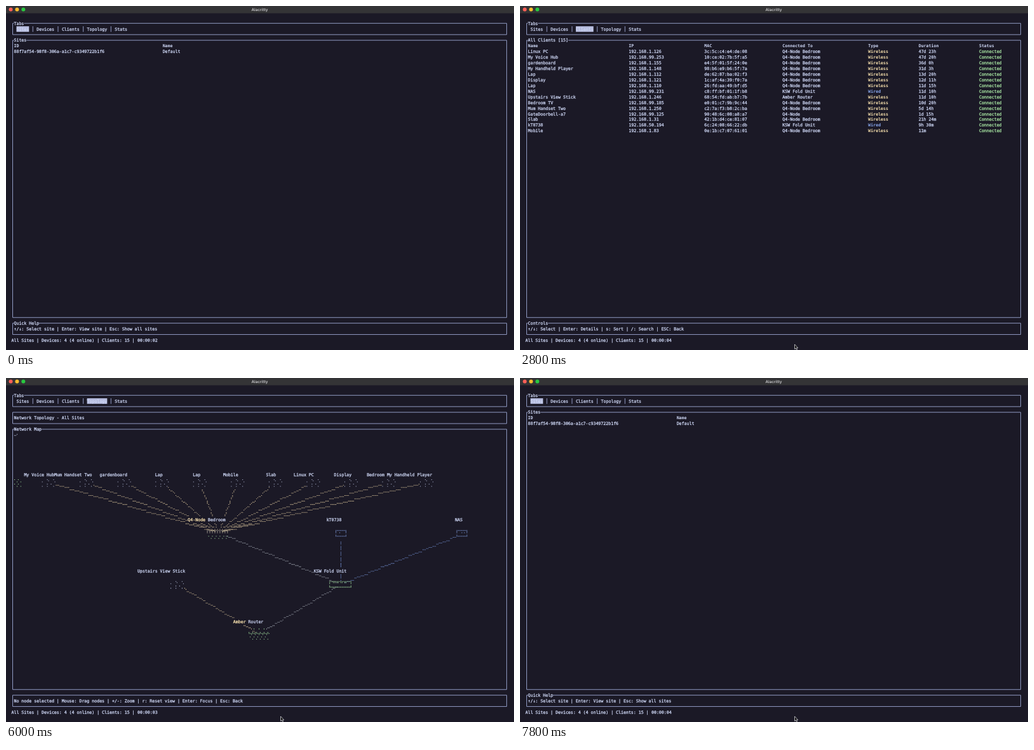
An HTML page that plays this animation: 800x543 px, repeating every 8000 ms.

```html
<!DOCTYPE html>
<html lang="en">
<head>
<meta charset="utf-8">
<title>Terminal network dashboard</title>
<style>
html, body { margin: 0; width: 100%; height: 100%; overflow: hidden; background: #1b1926; }
svg { display: block; width: 800px; height: 543px; }
text { font: 6.593px "DejaVu Sans Mono", monospace; white-space: pre; text-rendering: geometricPrecision; stroke-width: .28; }
.bold { font-weight: 700; stroke-width: 0; }
.title { font: 600 6.3px Inter, sans-serif; }
.scene, .tick, #cursor { opacity: 0; animation: 8s step-end infinite; }
#sites { animation-name: sites; }
#devices { animation-name: devices; }
#clients { animation-name: clients; }
#topology { animation-name: topology; }
#stats { animation-name: stats; }
#cursor { animation-name: cursor; }
.tick { animation-name: tick; }
@keyframes sites { 0% { opacity: 1 } 15% { opacity: 0 } 97.5%, 100% { opacity: 1 } }
@keyframes devices { 0% { opacity: 0 } 15% { opacity: 1 } 35%, 100% { opacity: 0 } }
@keyframes clients { 0% { opacity: 0 } 35% { opacity: 1 } 57.5%, 100% { opacity: 0 } }
@keyframes topology { 0% { opacity: 0 } 57.5% { opacity: 1 } 77.5%, 100% { opacity: 0 } }
@keyframes stats { 0% { opacity: 0 } 77.5% { opacity: 1 } 97.5%, 100% { opacity: 0 } }
@keyframes cursor { 0% { opacity: 0 } 15%, 100% { opacity: 1 } }
@keyframes tick { 0% { opacity: 1 } 12.5%, 100% { opacity: 0 } }
</style>
</head>
<body>
<svg id="stage" viewBox="0 0 800 543"></svg>
<script>
const BG = '#1b1926', FG = '#cdd6f4', LINE = '#a0abd6', GREEN = '#a6e3a1',
      YELLOW = '#f9e2af', RED = '#f38ba8', BLUE = '#89a8ee';
const CELL_W = 3.969, CELL_H = 8.932;
const left = col => 8.53 + CELL_W * col;
const midX = col => left(col + 0.5);
const midY = row => 27.3 + CELL_H * row;
const range = (n, fn) => Array.from({ length: n }, (_, i) => fn(i));

const rect = (x, y, w, h, fill) => `<rect x="${x}" y="${y}" width="${w}" height="${h}" fill="${fill}"/>`;
const stroke = d => `<path d="${d}" fill="none" stroke="${LINE}" stroke-width=".9"/>`;
const text = (col, row, str, color = FG, bold = false) =>
  `<text x="${left(col)}" y="${midY(row) + 2.35}" fill="${color}" stroke="${color}"${bold ? ' class="bold"' : ''}>${str}</text>`;
const label = (col, row, str, color) =>
  rect(left(col), midY(row) - 4.4, CELL_W * str.length, 8.8, BG) + text(col, row, str, color);

function box(c0, r0, c1, r1, title = '') {
  return stroke(`M${midX(c0)} ${midY(r0)}H${midX(c1)}V${midY(r1)}H${midX(c0)}Z`) +
    (title && label(c0 + 1, r0, title));
}
// Rows of cells; each style entry is [column, color, bold]
const table = (row, styles, head, rows) =>
  head.map((s, i) => text(styles[i][0], row, s, FG, true)).join('') +
  rows.map((cells, r) => cells.map((s, i) => {
    const [col, color, bold] = styles[i];
    return text(col, row + 1 + r, s, s === 'Wired' ? BLUE : color, bold);
  }).join('')).join('');

const tabs = [['Sites', 2], ['Devices', 10], ['Clients', 20], ['Topology', 30], ['Stats', 41]];
const tabBar = active => box(0, 0, 196, 2, 'Tabs') + tabs.map(([name, col], i) =>
  (i === active ? rect(left(col), 32, name.length * CELL_W, 8.8, '#b5bbdd') : '') +
  text(col, 1, name) +
  (i ? stroke(`M${midX(col - 2)} 32v8.800`) : '')).join('');
const help = (title, str) => box(0, 53, 196, 55, title) + text(1, 54, str);
const scene = (id, index, body) => `<g id="${id}" class="scene">${tabBar(index)}${body}</g>`;

const NODE = 'Q4-Node', BEDROOM = 'Q4-Node Bedroom', SWITCH = 'KSW Fold Unit', ROUTER = 'Amber Router';
const fleet = [
  [ROUTER, 'AMR', 15.5, 78.3, '↑14.30 Kbps/↓21.74 Kbps', '4.1.13', '11d 10h'],
  [SWITCH, SWITCH, 2.3, 80.9, '↑102.86 Kbps/↓7.86 Kbps', '2.1.0', '112d 15h'],
  [NODE, 'Q4 Node', 6.7, 29.9, '↑5.01 Kbps/↓35.22 Kbps', '6.6.77', '147d 16h'],
  [BEDROOM, 'Q4 Node', 6.7, 30.7, '↑102.38 Kbps/↓7.53 Kbps', '6.6.77', '147d 16h']
];
const pct = n => n.toFixed(1) + '%';

function sitesScene() {
  return scene('sites', 0, box(0, 3, 196, 52, 'Sites') +
    table(4, [[1, FG], [60, FG]], ['ID', 'Name'], [['88f7af54-98f8-306a-a1c7-c9349722b1f6', 'Default']]) +
    help('Quick Help', '↑/↓: Select site | Enter: View site | Esc: Show all sites'));
}

function devicesScene() {
  const bar = (col, row, eighths, color) => {
    const h = Math.max(1, CELL_H * eighths / 8);
    return rect(left(col), midY(row) + CELL_H / 2 - h, CELL_W, h, color);
  };
  const summary = [[1, 'Total: 4 |'], [12, 'Online: 4', GREEN], [22, '|'], [24, 'Updating: 0', YELLOW, true],
    [36, '|'], [38, 'Offline: 0', RED, true], [49, '|'], [54, 'APs: 3', '#c4e0cf'], [61, '|'],
    [66, 'Switches: 2', YELLOW, true]].map(([c, s, color, bold]) => text(c, 4, s, color, bold)).join('');
  const icons = `<path d="M211 59q0 7 8 8zM214 63l4-3.500" fill="#c9ccd3" stroke="#c9ccd3" stroke-width=".9"/>
    <path d="M260 60l3 2M262 59l2 2M262 64l3-3 2 3-2 2zM265 65l3 2" fill="#5c4a42" stroke="#6d5a50" stroke-width=".9"/>`;
  const rows = fleet.map(d => [d[0], d[1], 'Online', '', '', d[4].slice(0, 22), d[5], d[6]]);
  const gauges = fleet.map((d, i) => {
    const row = 8 + i, color = d[3] > 60 ? YELLOW : GREEN;
    return bar(92, row, 1, GREEN) + text(95, row, pct(d[2]), GREEN) +
      bar(112, row, Math.ceil(d[3] / 100 * 8), color) + text(115, row, pct(d[3]), color, d[3] > 60);
  }).join('');
  return scene('devices', 1, box(0, 3, 196, 5, 'Device Summary - All Sites') + summary + icons +
    box(0, 6, 196, 52, 'All Devices [4]') + gauges +
    table(7, [[1, FG], [41, FG], [71, GREEN], [92, GREEN], [112, FG], [133, FG], [156, FG], [177, FG]],
      ['Name', 'Model', 'Status', 'Load', 'Memory', 'TX/RX', 'Firmware', 'Uptime'], rows) +
    help('Controls', '↑/↓: Select  Enter: Details  s: Sort  /: Search  r: Restart  ESC: Back'));
}

function clientsScene() {
  const rows = `Linux PC,1.126,3c:5c:c4:e4:de:08,B,47d 23h
My Voice Hub,99.253,10:ce:02:7b:5f:a5,B,47d 20h
gardenboard,1.155,e4:5f:01:5f:24:0e,B,36d 0h
My Handheld Player,1.148,98:b6:e9:b6:5f:7a,B,31d 3h
Lap,1.112,de:62:87:ba:02:f3,B,13d 20h
Display,1.121,1c:af:4a:39:f0:7a,B,12d 11h
Lap,1.110,26:fd:aa:49:bf:d5,B,11d 15h
NAS,99.231,c8:ff:bf:01:1f:b8,S,11d 10h
Upstairs View Stick,1.246,68:54:fd:ab:b7:7b,R,11d 10h
Bedroom TV,99.185,e0:01:c7:9b:9c:44,B,10d 20h
Mum Handset Two,1.250,c2:7a:f3:b8:2c:ba,B,5d 14h
GateDoorbell-a7,99.125,90:48:6c:08:a8:a7,N,1d 15h
Slab,1.31,42:1b:d4:ce:81:07,B,21h 24m
kT0738,50.194,6c:24:08:66:22:db,S,9h 30m
Mobile,1.83,0e:1b:c7:07:61:01,B,11m`.split('\n').map(line => {
    const [name, ip, mac, via, time] = line.split(',');
    const parent = { B: BEDROOM, S: SWITCH, R: ROUTER, N: NODE }[via];
    return [name, '192.168.' + ip, mac, parent, via === 'S' ? 'Wired' : 'Wireless', time, 'Connected'];
  });
  return scene('clients', 2, box(0, 3, 196, 52, 'All Clients [15]') +
    table(4, [[1, FG], [41, FG], [71, FG], [102, FG], [136, YELLOW, true], [156, FG], [180, GREEN]],
      ['Name', 'IP', 'MAC', 'Connected To', 'Type', 'Duration', 'Status'], rows) +
    help('Controls', '↑/↓: Select | Enter: Details | s: Sort | /: Search | ESC: Back'));
}

function topologyScene() {
  const DX = CELL_W / 2, DY = CELL_H / 4;
  // Snap a point to a 2x4 braille dot; the dots sit closer inside a cell than across cells
  const braille = ([x, y]) => {
    const i = Math.floor((x - left(0)) / DX), j = Math.floor((y - midY(-0.5)) / DY);
    return [midX(i >> 1) + (i % 2 - 0.5) * 1.9, midY(j >> 2) + (j % 4 - 1.5) * 1.75];
  };
  const dots = (color, pts) => `<path d="${pts.map(braille).map(([x, y]) =>
    `M${(x - 0.55).toFixed(2)} ${y.toFixed(2)}h1.100`).join('')}" stroke="${color}" stroke-width="1.050"/>`;
  // Straight link that leaves room for the icons
  const link = (color, [x0, y0], [x1, y1]) => {
    const n = Math.round(Math.max(Math.abs(x1 - x0) / DX, Math.abs(y1 - y0) / DY));
    return dots(color, range(n, i => [x0 + (x1 - x0) * i / n, y0 + (y1 - y0) * i / n])
      .filter(([x, y]) => Math.hypot(x - x0, y - y0) > 12 && Math.hypot(x - x1, y - y1) > 6));
  };
  const grid = (color, x, y, cols, rows, keep) => dots(color,
    range(cols * rows, i => [i % cols, Math.floor(i / cols)]).filter(([i, j]) => keep(i, j))
      .map(([i, j]) => [x + i * DX, y + j * DY]));
  const frame = (color, x, y, cols, rows) => grid(color, x, y, cols, rows,
    (i, j) => i === 0 || j === 0 || i === cols - 1 || j === rows - 1);
  const weave = (i, j) => (i * 5 + j * 2 + i * j) % 3 === 0;
  const wifi = ([x, y]) => dots('#b3bbd8', [[-10, -1], [-10, 6], [-2, -5], [0, -3], [-2, 1], [4, 1], [-1, 6], [9, -4], [11, -1], [8, 6]]
    .map(([dx, dy]) => [x + dx, y + dy]));

  const ap = [335, 244], sw = [527, 326], wired = [527, 246], nas = [720, 246],
        stick = [269, 326], router = [398, 404];
  const leaves = range(11, i => [66.8 + 59.55 * i, 165]);
  const links = leaves.map(p => link('#d8c39a', p, ap)).join('') +
    link('#a9afb9', ap, sw) + link('#7390d2', wired, sw) + link('#7390d2', nas, sw) +
    link('#d8c39a', stick, router) + link('#a9afb9', router, sw);
  const icons = [...leaves, stick].map(wifi).join('') +
    grid('#d6cdb6', 317, 241, 17, 3, (i, j) => j === 0 || i % 2 === 0) +
    grid(GREEN, 319, 248.5, 16, 3, weave) +
    frame(BLUE, 519, 241.5, 9, 5) + frame(BLUE, 711, 241.5, 9, 5) +
    dots(BLUE, [[526, 245], [718, 244], [722, 244]]) +
    frame(GREEN, 510, 321, 18, 5) + grid(GREEN, 516, 323.5, 12, 1, i => i % 3 < 2) +
    grid(GREEN, 390, 397, 10, 1, i => i % 4 === 0) +
    grid(GREEN, 382, 401.5, 17, 3, (i, j) => j === 1 || weave(i, j)) +
    grid(GREEN, 384, 408.5, 15, 3, weave) +
    grid(GREEN, 12.5, 160, 6, 6, weave) + dots(FG, [[14, 91.5], [16, 90], [18, 88.5]]);
  const names = [[5, 14, 'My Voice Hub'], [17, 14, 'Mum Handset Two'], [35, 14, 'gardenboard'], [57, 14, 'Lap'],
    [72, 14, 'Lap'], [84, 14, 'Mobile'], [101, 14, 'Slab'], [112, 14, 'Linux PC'], [128, 14, 'Display'],
    [141, 14, 'Bedroom'], [149, 14, 'My Handheld Player'], [70, 22, BEDROOM], [70, 22, NODE, YELLOW],
    [125, 22, 'kT0738'], [176, 22, 'NAS'], [50, 31, 'Upstairs View Stick'], [120, 31, SWITCH],
    [88, 40, ROUTER], [88, 40, 'Amber', YELLOW]].map(n => label(...n)).join('');
  return scene('topology', 3, box(0, 3, 196, 5) + text(1, 4, 'Network Topology - All Sites') +
    box(0, 6, 196, 52, 'Network Map') + links + icons + names +
    help('', 'No node selected | Mouse: Drag nodes | +/-: Zoom | r: Reset view | Enter: Focus | Esc: Back'));
}

function statsScene() {
  const series = (c0, c1, row, color) => range(c1 - c0 + 1, i =>
    `<circle cx="${midX(c0 + i)}" cy="${midY(row)}" r=".95" fill="${color}"/>`).join('');
  const axes = (c0, c1) => stroke(`M${midX(c0)} 148V${midY(53)}H${midX(c1)}`);
  const put = items => items.map(item => text(...item)).join('');
  const summary = ['Devices Online: 4/4', 'Total Clients: 15', '• Wireless: 13', '• Wired: 2', '',
    'Network Link Speed:', '↑ 224.54 Kbps', '↓ 72.34 Kbps'].map((s, i) => text(1, 4 + i, s)).join('');
  return scene('stats', 4, box(0, 3, 58, 12, 'Summary - All Sites') + summary +
    box(59, 3, 196, 12, 'Device Status') +
    table(4, [[60, GREEN], [112, GREEN], [134, GREEN], [155, GREEN]], ['Device', 'CPU', 'Memory', 'Traffic'],
      fleet.map(d => [d[0], pct(d[2]), pct(d[3]), d[4]])) +
    box(0, 13, 98, 55, 'Client History') + axes(6, 97) +
    series(7, 87, 17, '#c2dccb') + series(94, 96, 17, BLUE) +
    series(7, 97, 22, YELLOW) + series(7, 97, 47, BLUE) + box(88, 14, 97, 18) +
    put([[1, 14, '15'], [7, 14, 'Clients'], [1, 52, '0'], [94, 52, 'Time'], [1, 54, '5m ago'], [95, 54, 'Now'],
      [89, 15, 'Total', GREEN], [89, 16, 'Wireless', YELLOW, true], [89, 17, 'Wired', BLUE]]) +
    box(99, 13, 196, 55, 'Network Link Speed (All Devices)') + axes(111, 195) +
    series(112, 191, 17, '#cfe0b4') + series(112, 195, 40, BLUE) + box(192, 14, 195, 17) +
    put([[100, 14, '224.54 Kbps'], [112, 14, 'Speed'], [100, 52, '0'], [192, 52, 'Time'], [106, 54, '5m ago'],
      [150, 54, '2.5m ago'], [193, 54, 'now'], [193, 15, 'TX', GREEN], [193, 16, 'RX', BLUE]]));
}

// Seconds since the last refresh, wrapping every five
const clock = range(8, i => `<g class="tick" style="animation-delay:${i ? i - 8 : 0}s">` +
  text(50, 56, `00:00:0${(i + 2) % 5}`) + '</g>').join('');

document.getElementById('stage').innerHTML =
  rect(0, 0, 800, 543, BG) + rect(0, 0, 800, 11.5, '#343436') +
  ['#ff5f57', '#febc2e', '#28c840'].map((c, i) => `<circle cx="${7.5 + 9.9 * i}" cy="5.5" r="3" fill="${c}"/>`).join('') +
  '<text class="title" x="399.5" y="7.7" text-anchor="middle" fill="#c8c8ca">Alacritty</text>' +
  sitesScene() + devicesScene() + clientsScene() + topologyScene() + statsScene() +
  text(0, 56, 'All Sites | Devices: 4 (4 online) | Clients: 15 |') + clock +
  '<path id="cursor" d="M432.5 534v7.5l1.7-1.5 1.2 2.7 1.3-.6-1.2-2.5h2.2z" fill="#111" stroke="#e8e8ee" stroke-width=".7"/>';
</script>
</body>
</html>
```
